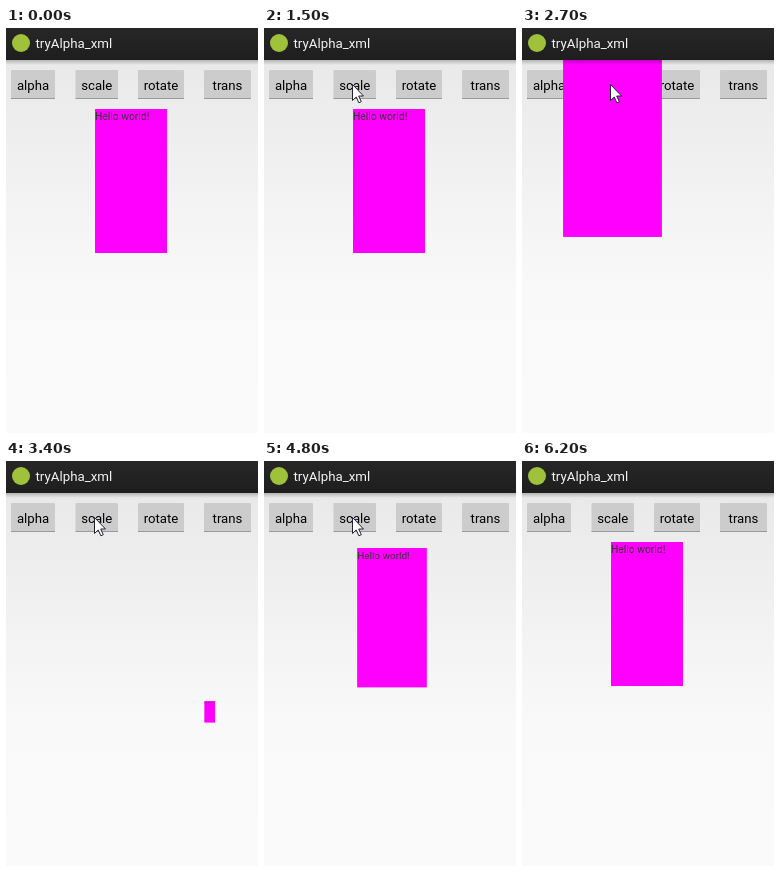
Animation of 252x405 px, one loop 6500 ms. Source, as an HTML page:

```html
<!DOCTYPE html>
<html lang="en">
<head>
<meta charset="utf-8">
<title>Scale animation</title>
<style>
html, body { margin: 0; width: 100%; height: 100%; overflow: hidden; }
svg { display: block; width: 100%; height: 100%; }
text { font-family: Roboto, sans-serif; }
</style>
</head>
<body>
<svg viewBox="0 0 252 405">
  <defs>
    <linearGradient id="page" x2="0" y2="1">
      <stop stop-color="#e9e9e9"/>
      <stop offset=".62" stop-color="#f9f9f9"/>
      <stop offset="1" stop-color="#fafafa"/>
    </linearGradient>
    <linearGradient id="bar" x2="0" y2="1">
      <stop stop-color="#272727"/>
      <stop offset="1" stop-color="#1e1e1e"/>
    </linearGradient>
    <linearGradient id="shade" x2="0" y2="1">
      <stop stop-opacity=".22"/>
      <stop offset="1" stop-opacity="0"/>
    </linearGradient>
  </defs>
  <rect y="32" width="252" height="373" fill="url(#page)"/>
  <g id="buttons" font-size="13.2" text-anchor="middle"></g>
  <g id="box">
    <rect x="89" y="81" width="72" height="144" fill="#f0f"/>
    <text x="89" y="92" font-size="10.3" fill="#333">Hello world!</text>
  </g>
  <rect y="32" width="252" height="5" fill="url(#shade)"/>
  <rect width="252" height="32" fill="url(#bar)"/>
  <circle cx="15" cy="15" r="9" fill="#a0c13a"/>
  <text x="29.5" y="20" font-size="13.3" fill="#f3f3f3">tryAlpha_xml</text>
  <path id="pointer" d="M.5.5V16.5L4.2 13 6.9 18.8 9.3 17.7 6.7 12H11.5Z" fill="#fff" stroke="#222236"/>
</svg>
<script>
const LOOP = 6500, STEP = 100, DURATION = 600, END_SCALE = 1.4;
const PIVOT = [217.5, 268];
const REST = [88, 56];

// Each tap highlights the button for one step, then grows the box until reset.
const runs = [
  { press: 800, start: 853, reset: 1500 },
  { press: 2100, start: 2153, reset: 2800 },
  { press: 3200, start: 3273, reset: 3900 },
  { press: 4300, start: 4425, reset: 5100 },
  { press: 5400, start: 5493, reset: 6200 }
];

const byId = id => document.getElementById(id);

function button(label, x, width) {
  byId('buttons').insertAdjacentHTML('beforeend', `<g>
    <rect class="halo" x="${x - 1.5}" y="40" width="${width + 3}" height="33" rx="2" fill="#a5d8ea" visibility="hidden"/>
    <rect class="face" x="${x}" y="42" width="${width}" height="29" rx="1" fill="#ccc"/>
    <rect x="${x}" y="70" width="${width}" height="1" fill="#999"/>
    <text x="${x + width / 2}" y="62">${label}</text></g>`);
  return byId('buttons').lastElementChild;
}

button('alpha', 5, 44);
const scaleButton = button('scale', 69.5, 42.5);
button('rotate', 132, 46);
button('trans', 198, 47);

function boxScale(t) {
  const run = runs.find(r => t >= r.start && t < r.reset);
  if (!run) return 1;
  const progress = Math.min(1, (t - run.start) / DURATION);
  return END_SCALE * (1 - Math.cos(Math.PI * progress)) / 2;
}

function mix(a, b, k) {
  return a.map((v, i) => v + (b[i] - v) * k);
}

function pointerAt(t) {
  if (t < 100 || t >= 6000) return null;
  if (t <= 300) return mix([116, 43], [78, 51], (t - 100) / 200);
  if (t < 400) return mix([78, 51], REST, (t - 300) / 100);
  if (t > 5700) return mix(REST, [240, 120], (t - 5700) / 200);
  return REST;
}

function draw(t) {
  const [px, py] = PIVOT;
  byId('box').setAttribute('transform',
    `translate(${px} ${py}) scale(${boxScale(t)}) translate(${-px} ${-py})`);

  const pressed = runs.some(r => t >= r.press && t < r.press + STEP);
  scaleButton.querySelector('.halo').setAttribute('visibility', pressed ? 'visible' : 'hidden');
  scaleButton.querySelector('.face').setAttribute('fill', pressed ? '#43b7e2' : '#ccc');

  const at = pointerAt(t);
  byId('pointer').setAttribute('visibility', at ? 'visible' : 'hidden');
  if (at) byId('pointer').setAttribute('transform', `translate(${at})`);
}

let origin;
function tick(now) {
  origin ??= now;
  draw(Math.floor((now - origin) % LOOP / STEP) * STEP);
  requestAnimationFrame(tick);
}
draw(0);
requestAnimationFrame(tick);
</script>
</body>
</html>
```
